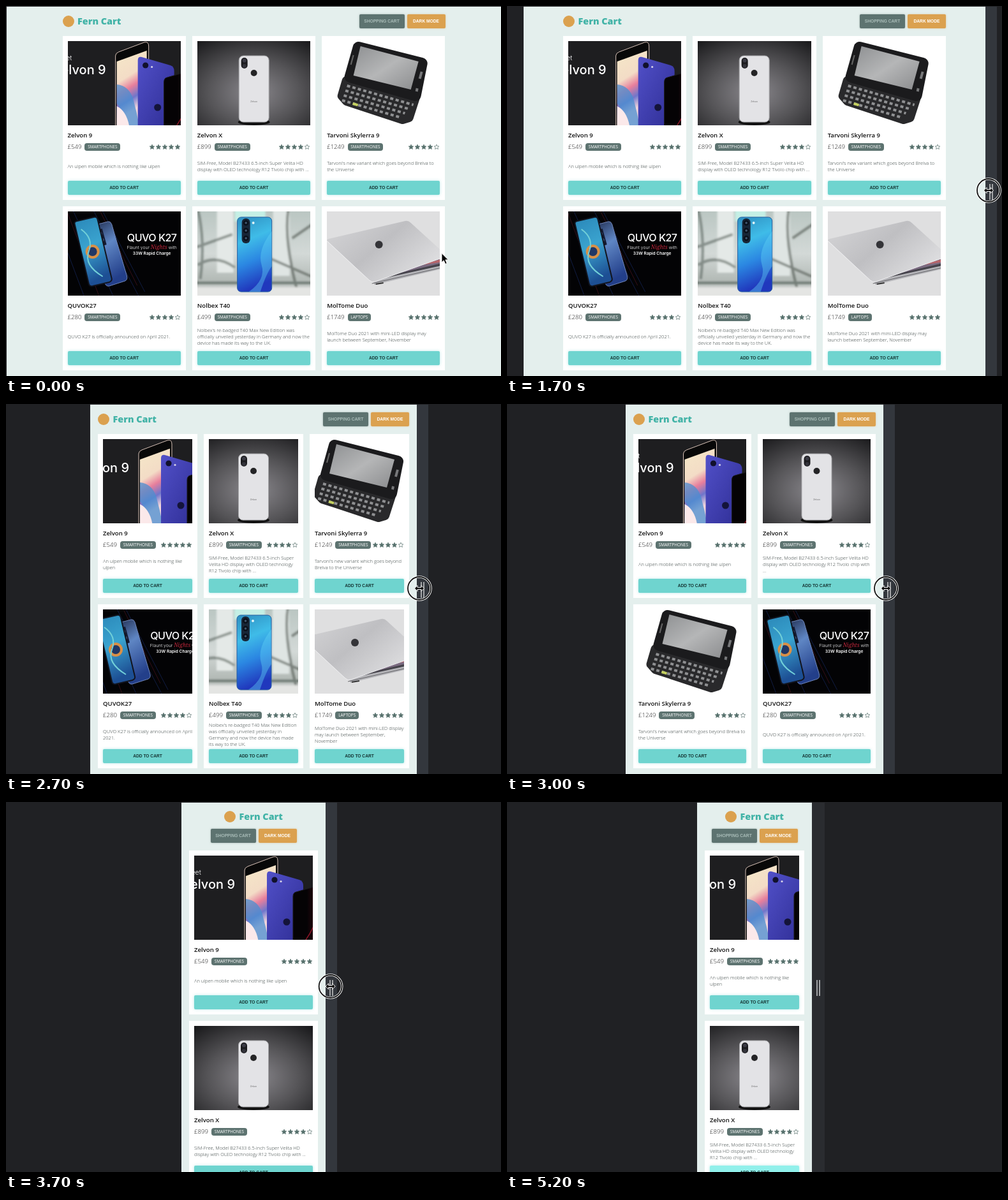
Recreate the animation shown at these times as an HTML page. Size 776 by 580 pixels, loop 5.4 s.

```html
<!DOCTYPE html>
<html lang="en">
<head>
<meta charset="utf-8">
<title>Responsive shop</title>
<style>
html, body { margin: 0; width: 100%; height: 100%; overflow: hidden; background: #202124; }
body { position: relative; font: 300 7.5px/10.25px "Open Sans", sans-serif; color: #333d3c; }
#page, #bar, #arrow, #ring { position: absolute; }
#page { top: 1px; bottom: 0; overflow: hidden; background: #e4efed; }
#inner { max-width: 600px; margin: 0 12px; padding-top: 12px; }
#page.wide #inner { margin: 0 auto; }
header { display: flex; justify-content: space-between; align-items: center; height: 22px; margin-bottom: 12px; }
.logo { display: flex; align-items: center; gap: 5.5px; height: 20px; font-size: 14.4px; font-weight: 800; color: #42b3a7; white-space: nowrap; }
.logo i { width: 18px; height: 18px; border-radius: 50%; background: #dba14f; }
.narrow header { flex-direction: column; justify-content: flex-start; height: 51px; }
.narrow nav { margin-top: 9px; }
nav { display: flex; gap: 4px; }
.btn { height: 22px; border-radius: 2px; text-align: center; font: bold 6.67px/22px "Liberation Sans", Arial, sans-serif; }
.cart { width: 71px; background: #5d7370; color: #a9bcb8; box-shadow: 0 0 3px #5d737080; }
.mode { width: 60px; background: #dba14f; color: #fff; box-shadow: 0 0 3px #dba14f80; }
main { display: grid; gap: 10px; }
.card { position: relative; height: 257px; background: #fff; }
.card > * { position: absolute; left: 8px; right: 8px; }
.card > svg { top: 8px; width: calc(100% - 16px); height: 132px; }
h2 { top: 149px; margin: 0; font-size: 9.6px; line-height: 14px; font-weight: 600; color: #111; white-space: nowrap; }
.row { top: 167px; height: 14px; display: flex; align-items: center; font-size: 9.6px; color: #222; }
.tag { margin-left: 5px; padding: 0 4.8px; border-radius: 4px; background: #5d7370; color: #fff; font-size: 6.4px; line-height: 12.6px; font-weight: 400; }
.stars { margin-left: auto; width: 50px; height: 10px; fill: #56706c; stroke: #56706c; stroke-width: .7; }
.desc { top: 184px; height: 40px; display: flex; align-items: center; }
.add { top: 227px; background: #6fd4cf; color: #173735; box-shadow: 0 0 4px #6fd4cf80; }
#bar { top: 1px; bottom: 0; }
#bar i { position: absolute; top: 278px; left: calc(50% - 3px); width: 2px; height: 25px; border: solid #a2a4a6; border-width: 0 2px; }
#arrow, #ring { left: 0; top: 0; overflow: visible; }
</style>
</head>
<body>
<svg width="0" height="0" style="position:absolute"><defs>
  <linearGradient id="wave" x2=".25" y2="1"><stop stop-color="#f5e8c8"/><stop offset=".4" stop-color="#f3dcc6"/><stop offset=".55" stop-color="#e77f9c"/><stop offset=".7" stop-color="#6f76cc"/><stop offset=".85" stop-color="#f2d6dc"/></linearGradient>
  <linearGradient id="violet" x2="1" y2="1"><stop stop-color="#5150c8"/><stop offset="1" stop-color="#2e2d94"/></linearGradient>
  <linearGradient id="red"><stop offset=".4" stop-color="#050305"/><stop offset=".9" stop-color="#4c0a16"/></linearGradient>
  <radialGradient id="steel" cy=".6" r=".72"><stop stop-color="#8a888d"/><stop offset=".5" stop-color="#555457"/><stop offset="1" stop-color="#19191b"/></radialGradient>
  <linearGradient id="glass" x2="1" y2="1"><stop stop-color="#8e9092"/><stop offset=".5" stop-color="#b5b6b7"/><stop offset="1" stop-color="#8b8c8e"/></linearGradient>
  <linearGradient id="sea" x2=".3" y2="1"><stop stop-color="#2a87b8"/><stop offset=".5" stop-color="#3aa3cf"/><stop offset="1" stop-color="#1d4f94"/></linearGradient>
  <linearGradient id="night" x2=".4" y2="1"><stop stop-color="#1c2747"/><stop offset=".45" stop-color="#5f86c4"/><stop offset="1" stop-color="#233f8a"/></linearGradient>
  <linearGradient id="aurora" x2=".2" y2="1"><stop stop-color="#2f8fc0"/><stop offset=".35" stop-color="#3fbce8"/><stop offset=".65" stop-color="#2b87e2"/><stop offset="1" stop-color="#2038bd"/></linearGradient>
  <linearGradient id="fog" x2="0" y2="1"><stop stop-color="#b9c5c1"/><stop offset=".5" stop-color="#d3d9d7"/><stop offset=".8" stop-color="#b3bab6"/><stop offset="1" stop-color="#e1e3e2"/></linearGradient>
  <linearGradient id="silver" x2="1" y2=".6"><stop stop-color="#d6d6d8"/><stop offset=".5" stop-color="#bfbfc2"/><stop offset="1" stop-color="#e0e0e2"/></linearGradient>
  <filter id="soft"><feGaussianBlur stdDeviation="1.5"/></filter>
</defs></svg>
<div id="page"><div id="inner">
  <header>
    <div class="logo"><i></i>Fern Cart</div>
    <nav><div class="btn cart">SHOPPING CART</div><div class="btn mode">DARK MODE</div></nav>
  </header>
  <main></main>
</div></div>
<div id="bar"><i></i></div>
<svg id="arrow" width="1" height="1"><path d="M0 0V14.5L3.3 11.4 5.7 17 8.3 15.9 5.9 10.4H10.4Z" stroke="#fff"/></svg>
<svg id="ring" width="1" height="1">
  <g fill="none"><circle r="18" stroke="#fff" stroke-width="3.6"/><circle r="18" stroke="#111" stroke-width="1.8"/></g>
  <path d="M-7.5 0L-3-4.5V-1.5H3V-4.5L7.5 0 3 4.5V1.5H-3V4.5Z" stroke="#fff"/>
</svg>
<script>
const $ = s => document.querySelector(s);
const box = (x, y, w, h, r, fill, extra = '') => `<rect x="${x}" y="${y}" width="${w}" height="${h}" rx="${r}" fill="${fill}" ${extra}/>`;
const shape = (d, fill, extra = '') => `<path d="${d}" fill="${fill}" ${extra}/>`;
const line = (d, color, width, extra = '') => shape(d, 'none', `stroke="${color}" stroke-width="${width}" ${extra}`);
const slab = (d, color, width) => shape(d, color, `stroke="${color}" stroke-width="${width}" stroke-linejoin="round"`);
const dot = (x, y, r, fill) => `<circle cx="${x}" cy="${y}" r="${r}" fill="${fill}"/>`;
const text = (x, y, size, str, extra = '') =>
  `<text x="${x}" y="${y}" font-size="${size}" font-family="Inter, sans-serif" fill="#fff" ${extra}>${str}</text>`;

// Pictures are drawn around their centre, 132 units tall
const trio = box(-150, -70, 300, 140, 0, '#1e1e20')
  + text(-107, -36, 10.5, 'Meet') + text(-29, -14, 20, 'Zelvon 9', 'text-anchor="end" font-weight="500"') + dot(-99, 46, 5.5, '#fff')
  + shape('M-14 70V-43Q-14-47-9-49L31-64Q38-66 38-58V70Z', '#080808', 'stroke="#d9c3b8"')
  + shape('M-12 70V-34L35-51V70Z', 'url(#wave)')
  + shape('M-12 2Q8 4 14 26T24 70H2Q-2 40-12 32Z', '#4b8fd0', 'opacity=".75"')
  + shape('M-12 36Q4 44 8 70H-12Z', '#fbe9ea')
  + shape('M21 70V-36Q21-42 27-41L72-28Q78-26 78-19V70Z', 'url(#violet)')
  + dot(33, -28, 4.6, '#11112c') + dot(43, -25.5, 1.6, '#d8d4e8') + dot(52, 38, 5.5, '#14143a')
  + shape('M62 70V-2Q62-8 67-9L109-21Q116-22 116-15V70Z', 'url(#red)', 'stroke="#1a1a1c"')
  + line('M82 66Q104 35 108-12', '#8c1527', 1.5);

const backplate = box(-100, -70, 200, 140, 0, 'url(#steel)')
  + '<ellipse cy="61" rx="25" ry="5" fill="#111"/>'
  + box(-23.5, -43, 47, 104, 7, '#e3e3e6', 'stroke="#a5a5a8"')
  + box(-20, -40, 10, 17, 5, '#1c1c1f') + dot(-15, -35.5, 3, '#3a3a44') + dot(-15, -27, 3, '#33333b')
  + dot(0, -16, 5, '#242426') + text(0, 30, 3.4, 'Zelvon', 'text-anchor="middle" style="fill:#444"');

const keyRow = i => line(`M${-57 - i * 2.6} ${4 + i * 7.6}l${104 - i * 4} ${30 - i}`, '#8f9092', 4, 'stroke-dasharray="5 3.8"');
const slider = box(-100, -70, 200, 140, 0, '#fff')
  + slab('M-58-4L-65 20-58 28 30 57 40 54 51 20Z', '#29292b', 14)
  + [0, 1, 2, 3].map(keyRow).join('') + line('M-48 32l8 2.4', '#c4d060', 4)
  + slab('M-39-56L60-31 50 19-52-10Z', '#1b1b1d', 18)
  + shape('M-36-58L55-34 43 10-47-12Z', 'url(#glass)')
  + line('M-51-29l4-15', '#666', 2) + line('M57-7l3-11M52 13l1-5', '#77787a', 4);

const duo = box(-100, -70, 200, 140, 0, '#030305')
  + line('M-96-20L-62 70M-80-66L-16 70M-50-70L22 66M-34-66L32 60', '#16275c', .7)
  + line('M-90-66L-40 66M-40-70L20 50', '#4b1520', .7)
  + shape('M-52-43L-26-50Q-22-51-20-46L4 36Q5 41 1 43L-24 51Q-28 52-30 48Z', 'url(#night)', 'stroke="#7187ba"')
  + shape('M-44-37l9-2 7 25-9 3Z', '#141a30') + dot(-38, -31, 3, '#42557f') + dot(-35, -21, 3, '#42557f')
  + shape('M-74-51L-48-57Q-43-58-42-53L-20 39Q-19 43-24 45L-50 51Q-55 52-56 47L-78-46Q-79-50-74-51Z', 'url(#sea)', 'stroke="#11141e" stroke-width="2"')
  + dot(-50, -3, 11, '#d99047') + dot(-50, -3, 7, '#213765') + line('M-68-38Q-48-24-56-3T-34 36', '#72d0d8', 2)
  + text(43, -19, 16.2, 'QUVO K27', 'text-anchor="middle" font-weight="500" letter-spacing="-.6"')
  + text(43, -7.5, 6.8, 'Flaunt your <tspan fill="#c5283b" font-size="8.5" font-style="italic" font-family="Noto Serif, serif">Nights</tspan> with', 'text-anchor="middle"')
  + text(43, 2, 6.6, '33W Rapid Charge', 'text-anchor="middle" font-weight="600"');

const garden = box(-100, -70, 200, 140, 0, 'url(#fog)')
  + '<g filter="url(#soft)">'
  + box(-58, -70, 26, 100, 0, '#e4e9e7') + box(30, -70, 26, 105, 0, '#dfe5e3') + box(-30, -70, 48, 20, 0, '#c5efe5')
  + line('M-88-70Q-76-20-84 40M-90-10L-34-30M-88 18Q-60 0-30 22', '#58615a', 4, 'opacity=".6"')
  + line('M54-70Q46-20 70 66M26 8L90 36M60-24L92-46', '#4c544e', 4, 'opacity=".6"')
  + box(-100, 44, 200, 4, 0, '#717b76') + box(-100, 53, 200, 20, 0, '#e4e5e3') + '</g>'
  + box(-26, -57, 54, 117, 6, 'url(#aurora)', 'stroke="#265d9e"')
  + shape('M28-35Q5-5 12 18T-8 60H10Q20 30 28 20Z', '#62d5f4', 'opacity=".4"')
  + box(-19, -55, 13, 39, 6, '#182637') + [-48, -36, -24].map(y => dot(-12.5, y, 4.3, '#0a101a') + dot(-12.5, y, 1.8, '#40566e')).join('')
  + dot(-1, -48, 2, '#dff4f8');

const laptop = box(-100, -70, 200, 140, 0, '#dfdfe0')
  + shape('M-16 44L100 8V22L-14 49Z', '#b4b4b8') + shape('M4 38L100 0V17Z', '#45434b')
  + shape('M24 31L100 3V13Z', '#7b6b81') + shape('M60 18L100 6V12Z', '#b9666b')
  + shape('M-87-19Q-91-21-86-23L34-51Q39-52 43-48L100 4-13 44Q-18 46-22 42Z', 'url(#silver)')
  + line('M-89-20L-22 42Q-18 46-13 44L100 4', '#efeff1', 1)
  + line('M-18 47L100 20', '#66666a', 1) + line('M-12 48l12-2', '#333', 2) + dot(-7, -14, 6, '#343438');

const products = [
  ['Zelvon 9', 549, 5, 'An ulpen mobile which is nothing like ulpen', trio, 250],
  ['Zelvon X', 899, 4, 'SIM-Free, Model B27433 6.5-inch Super Velita HD display with OLED technology R12 Tivolo chip with ...', backplate],
  ['Tarvoni Skylerra 9', 1249, 4, "Tarvoni's new variant which goes beyond Brelva to the Universe", slider],
  ['QUVOK27', 280, 4, 'QUVO K27 is officially announced on April 2021.', duo],
  ['Nolbex T40', 499, 4, "Nolbex's re-badged T40 Max New Edition was officially unveiled yesterday in Germany and now the device has made its way to the UK.", garden],
  ['MolTome Duo', 1749, 5, 'MolTome Duo 2021 with mini-LED display may launch between September, November', laptop],
];

const star = (i, filled) => `<path transform="translate(${i * 10 + 5} 5)" fill-opacity="${+filled}"
  d="M0-3.9L1.1-1.3 3.8-1.1 1.8.7 2.4 3.4 0 2-2.4 3.4-1.8.7-3.8-1.1-1.1-1.3Z"/>`;

$('main').innerHTML = products.map(([name, price, rating, desc, art, w = 193]) => `<div class="card">
  <svg viewBox="${-w / 2} -66 ${w} 132" preserveAspectRatio="xMidYMid slice">${art}</svg>
  <h2>${name}</h2>
  <div class="row">£${price}<span class="tag">${art === laptop ? 'LAPTOPS' : 'SMARTPHONES'}</span>
    <svg class="stars">${[0, 1, 2, 3, 4].map(i => star(i, i < rating)).join('')}</svg></div>
  <div class="desc"><span>${desc}</span></div>
  <div class="btn add">ADD TO CART</div></div>`).join('');

// time, left edge of the page, centre of the resize cursor
const drag = [
  [1400, 1, 795], [1500, 5, 778], [1700, 26, 755], [2000, 55, 725], [2300, 88, 695], [2600, 114, 666],
  [3000, 186, 594], [3200, 214, 566], [3400, 243, 537.5], [3800, 286, 499], [4200, 298, 489],
];
// time, x, y of the arrow
const enter = [[0, 683, 387.5], [100, 690, 378], [200, 702, 364], [300, 717, 357], [400, 702, 378], [700, 702, 378], [800, 735, 342], [900, 764, 312]];
const leave = [[4500, 487, 294], [4600, 483, 330], [4700, 471, 400], [4800, 449, 480], [4900, 420, 550]];

function at(keys, t) {
  const i = keys.findIndex(k => k[0] >= t);
  if (i < 1) return keys[i ? keys.length - 1 : 0].slice(1);
  const a = keys[i - 1], b = keys[i], f = (t - a[0]) / (b[0] - a[0]);
  return a.slice(1).map((v, j) => v + (b[j + 1] - v) * f);
}
const place = (el, shown, x, y) => {
  el.style.display = shown ? '' : 'none';
  el.style.transform = `translate(${x}px, ${y}px)`;
};
const page = $('#page'), bar = $('#bar'), lastAdd = document.querySelectorAll('.add')[1];

function draw(now) {
  const t = Math.floor(now % 5400 / 100) * 100;
  const [edge, grip] = at(drag, t), left = Math.round(edge);
  const right = left < 2 ? 776 : 776 - left, width = right - left;
  const inner = Math.min(600, width - 24), cols = Math.min(3, Math.floor((inner + 10) / 160));
  page.style.left = left + 'px';
  page.style.width = width + 'px';
  page.className = (width > 624 ? 'wide ' : '') + (cols < 2 ? 'narrow' : '');
  $('main').style.gridTemplateColumns = `repeat(${Math.max(1, cols)}, minmax(0, 1fr))`;
  bar.style.left = right + 'px';
  bar.style.width = (t < 3800 ? 18 : 20) + 'px';
  bar.style.background = t >= 1500 && t < 4600 ? '#33373d' : '#2a2c30';
  const [x, y] = at(t < 4500 ? enter : leave, t);
  place($('#arrow'), t < 1000 || t >= 4500 && t < 5000, x, y);
  place($('#ring'), t >= 1500 && t < 4500, grip, 289);
  const glow = Math.max(0, Math.min(1, (t - 4900) / 300));
  lastAdd.style.background = `rgb(${111 + 34 * glow}, ${212 + 28 * glow}, ${207 + 28 * glow})`;
}
const start = performance.now();
(function loop() {
  draw(performance.now() - start);
  requestAnimationFrame(loop);
})();
</script>
</body>
</html>
```
